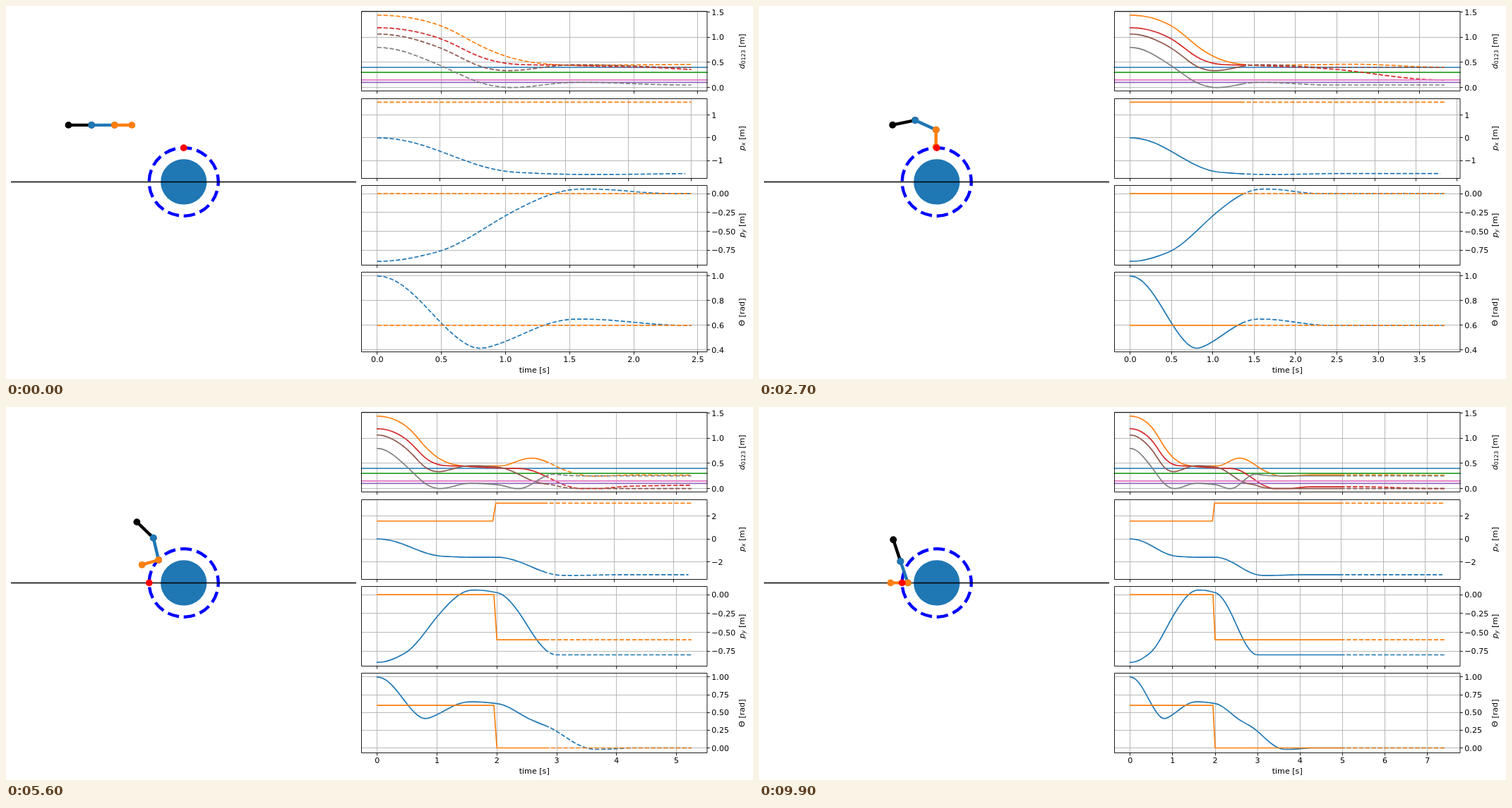
An HTML page that plays this animation: 1058x529 px, repeating every 10000 ms.

```html
<!DOCTYPE html>
<html lang="en">
<head>
<meta charset="utf-8">
<title>Planar arm with predicted motion</title>
<style>
  html, body { margin: 0; width: 100%; height: 100%; overflow: hidden; background: #fff; }
  svg { display: block; width: 1058px; height: 529px; font: 11.11px "DejaVu Sans", sans-serif; }
  path { fill: none; }
  .grid { stroke: #b0b0b0; stroke-width: .89; }
  .axis { stroke: #000; stroke-width: .89; }
  .solid { stroke-width: 1.67; stroke-linecap: square; stroke-linejoin: round; }
  .dash { stroke-width: 1.67; stroke-dasharray: 6.17 2.67; stroke-linejoin: round; }
  .link { stroke-width: 4.4; stroke-linecap: square; }
</style>
</head>
<body>
<svg viewBox="0 0 1058 529">
  <ellipse cx="251.7" cy="249.4" rx="32.6" ry="32.2" fill="#1f77b4"/>
  <path d="M251.7 297.7A49 48.3 0 0 0 251.7 201.1A49 48.3 0 0 0 251.7 297.7"
    stroke="#00f" stroke-width="4.4" stroke-dasharray="16.4 7.1"/>
  <path d="M7 249.5H496" stroke="#000" stroke-width="1.67"/>
  <g id="arm"></g>
  <g id="plots"></g>
  <text x="748.2" y="520.4" text-anchor="middle">time [s]</text>
  <g id="names" text-anchor="middle"></g>
</svg>
<script>
const DT = 0.05, HORIZON = 49, FRAMES = 100, SWITCH = 40;
const C = ['#1f77b4', '#ff7f0e', '#2ca02c', '#d62728', '#9467bd', '#8c564b', '#e377c2', '#7f7f7f'];
const BOX = { left: 503.5, width: 489.5, top: 7.9, height: 112.8, pitch: 123.3 };
const LINKS = [0.4, 0.4, 0.3], LIMITS = [0.4, 0.3, 0.1, 0.15];

// Each motion is a start value plus eased moves [from, to, amount]:
// "reach" heads for the first goal, "turn" follows once the goal has switched.
const MOTION = {
  x: {
    start: -0.9,
    reach: [[0, 1.05, 0.3], [0.45, 1.6, 0.66], [1.65, 2.3, -0.06]],
    turn: [[2, 3, -0.8]]
  },
  y: {
    start: 1,
    reach: [[0, 0.85, -0.6], [0.7, 1.55, 0.25], [1.6, 2.4, -0.05]],
    turn: [[2, 2.8, -0.25], [2.6, 3.65, -0.37], [3.75, 4.3, 0.02]]
  },
  tip: {
    start: 0,
    reach: [[0, 1.1, -1.3], [0.2, 1.65, -0.31], [1.8, 2.6, 0.04]],
    turn: [[2, 3.15, -1.63], [3.3, 4.1, 0.06]]
  },
  mid: {
    start: 0, sway: 0.9,
    reach: [[0, 0.9, -0.6], [0.6, 1.9, 0.27]],
    turn: [[2.05, 3, -1.13], [3.1, 4.3, 0.217]]
  },
  base: {
    start: 0, sway: -0.85,
    reach: [[0, 0.7, -0.1], [0.6, 1.3, 0.31], [1.35, 1.95, -0.09]],
    turn: [[2.05, 3, -1], [2.8, 4.2, -0.375]]
  }
};

const ramp = (v, a, b) => Math.min(1, Math.max(0, (v - a) / (b - a)));
const ease = (t, a, b) => (1 - Math.cos(Math.PI * ramp(t, a, b))) / 2;
const n2 = v => v.toFixed(2);

// Value at time t as known or predicted at step k; the elbows sway in the forecast.
function valueAt({ start, reach, turn, sway = 0 }, t, k) {
  const turned = k >= SWITCH;
  const from = Math.max(turned ? 3.4 : 2, k * DT + 0.4);
  const amount = sway * (1 - 1.14 * ramp(k, 16, 68));
  return [...reach, ...(turned ? turn : []), [from, from + 1.8, amount]]
    .reduce((sum, [a, b, by]) => sum + by * ease(t, a, b), start);
}

const stateAt = (t, k) => Object.fromEntries(
  Object.entries(MOTION).map(([key, m]) => [key, valueAt(m, t, k)]));

// Joint positions from the base outwards, worked back from the tip.
function jointsOf(s) {
  const pts = [[s.x, s.y]], angles = [s.base, s.mid, s.tip];
  for (let i = 2; i >= 0; i--) {
    const [x, y] = pts[0];
    pts.unshift([x - LINKS[i] * Math.cos(angles[i]), y - LINKS[i] * Math.sin(angles[i])]);
  }
  return pts;
}

function drawArm(k) {
  const pts = jointsOf(stateAt(k * DT, k));
  const px = ([x, y]) => [n2(251.7 + 81.6 * x), n2(249.4 - 80.5 * y)];
  const dot = (p, c) => `<circle cx="${px(p)[0]}" cy="${px(p)[1]}" r="4.9" fill="${c}"/>`;
  const links = ['#000', C[0], C[1]].map((c, i) =>
    `<path class="link" stroke="${c}" d="M${px(pts[i])}L${px(pts[i + 1])}"/>`
      + dot(pts[i], c) + dot(pts[i + 1], c));
  return links.join('') + dot(k < SWITCH ? [0, 0.6] : [-0.6, 0], '#f00');
}

function ticksOf(lo, hi, bins) {
  const raw = (hi - lo) / bins, mag = 10 ** Math.floor(Math.log10(raw));
  const step = [1, 2, 2.5, 5, 10].map(m => m * mag).find(s => s >= raw - 1e-9);
  const digits = step > 0.9 ? 0 : Math.abs(step - 0.25) < 1e-6 ? 2 : 1;
  const list = [];
  for (let i = Math.ceil(lo / step - 1e-9); i * step <= hi + 1e-9; i++) {
    list.push({ v: i * step, label: (i * step).toFixed(digits).replace('-', '\u2212') });
  }
  return list;
}

function drawPanel(row, k, series, levels, steps) {
  const { left, width, height } = BOX, right = left + width;
  const top = BOX.top + row * BOX.pitch, bottom = top + height;
  const crisp = v => Math.floor(v) + 0.5;
  const end = (k + steps) * DT;
  const all = series.flatMap(s => s.values);
  const min = Math.min(...all), max = Math.max(...all), pad = (max - min) / 20;
  const lo = min - pad, hi = max + pad;
  const X = t => left + width * (t / end + 0.05) / 1.1;
  const Y = v => bottom - (v - lo) / (hi - lo) * height;
  let grid = '', axis = '', text = '', lines = '';

  for (const { v, label } of ticksOf(-end / 20, end * 1.05, 9)) {
    const x = crisp(X(v));
    grid += `M${x} ${crisp(top)}V${crisp(bottom)}`;
    axis += `M${x} ${crisp(bottom)}v3.9`;
    if (row === 3) text += `<text x="${n2(X(v))}" y="505" text-anchor="middle">${label}</text>`;
  }
  for (const { v, label } of ticksOf(lo, hi, 5)) {
    const y = crisp(Y(v));
    grid += `M${left} ${y}H${right}`;
    axis += `M${right} ${y}h3.9`;
    text += `<text x="999.3" y="${n2(Y(v) + 4.1)}">${label}</text>`;
  }
  axis += `M${left} ${crisp(top)}H${right}V${crisp(bottom)}H${left}Z`;

  const trace = (values, from, to) => 'M' + values.slice(from, to)
    .map((v, i) => n2(X((from + i) * DT)) + ' ' + n2(Y(v))).join('L');
  series.forEach((s, i) => {
    if (levels) {
      lines += `<path class="solid" stroke="${C[2 * i]}" d="M${left} ${n2(Y(levels[i]))}H${right}"/>`;
    }
    if (k) lines += `<path class="solid" stroke="${s.color}" d="${trace(s.values, 0, k + 1)}"/>`;
    lines += `<path class="dash" stroke="${s.color}" d="${trace(s.values, k)}"/>`;
  });
  return `<path class="grid" d="${grid}"/>${lines}<path class="axis" d="${axis}"/>${text}`;
}

function drawPlots(k) {
  const count = k + HORIZON + 1;
  const states = Array.from({ length: count }, (_, i) => stateAt(i * DT, k));
  const joints = states.map(jointsOf);
  const gaps = LIMITS.map((m, j) => ({
    color: C[2 * j + 1],
    values: joints.map(p => Math.max(0, Math.hypot(...p[j]) - 0.4 - m))
  }));
  const goal = (a, b, n = count) => ({
    color: C[1],
    values: Array.from({ length: n }, (_, i) => k >= SWITCH && i >= SWITCH ? b : a)
  });
  const curve = key => ({ color: C[0], values: states.map(s => s[key]) });
  return drawPanel(0, k, gaps, LIMITS, HORIZON)
    + drawPanel(1, k, [curve('tip'), goal(Math.PI / 2, Math.PI, count + 1)], null, HORIZON + 1)
    + drawPanel(2, k, [curve('x'), goal(0, -0.6)], null, HORIZON)
    + drawPanel(3, k, [curve('y'), goal(0.6, 0)], null, HORIZON);
}

const el = id => document.getElementById(id);
const italic = 'font-style="italic"';
const label = (name, sub, style = '') => `<tspan ${italic}>${name}</tspan>`
  + `<tspan dy="1.8" font-size="7.8" ${style}>${sub}</tspan><tspan dy="-1.8"> [m]</tspan>`;
el('names').innerHTML = [
  label('d', '0123'), label('p', 'x', italic), label('p', 'y', italic), '\u0398 [rad]'
].map((t, i) => {
  const y = n2(BOX.top + i * BOX.pitch + BOX.height / 2);
  return `<text transform="translate(1045.5 ${y}) rotate(-90)">${t}</text>`;
}).join('');

let shown = -1;
const start = performance.now();
function tick() {
  const k = Math.floor(Math.max(0, performance.now() - start) / 100) % FRAMES;
  if (k !== shown) {
    shown = k;
    el('arm').innerHTML = drawArm(k);
    el('plots').innerHTML = drawPlots(k);
  }
  requestAnimationFrame(tick);
}
tick();
</script>
</body>
</html>
```
